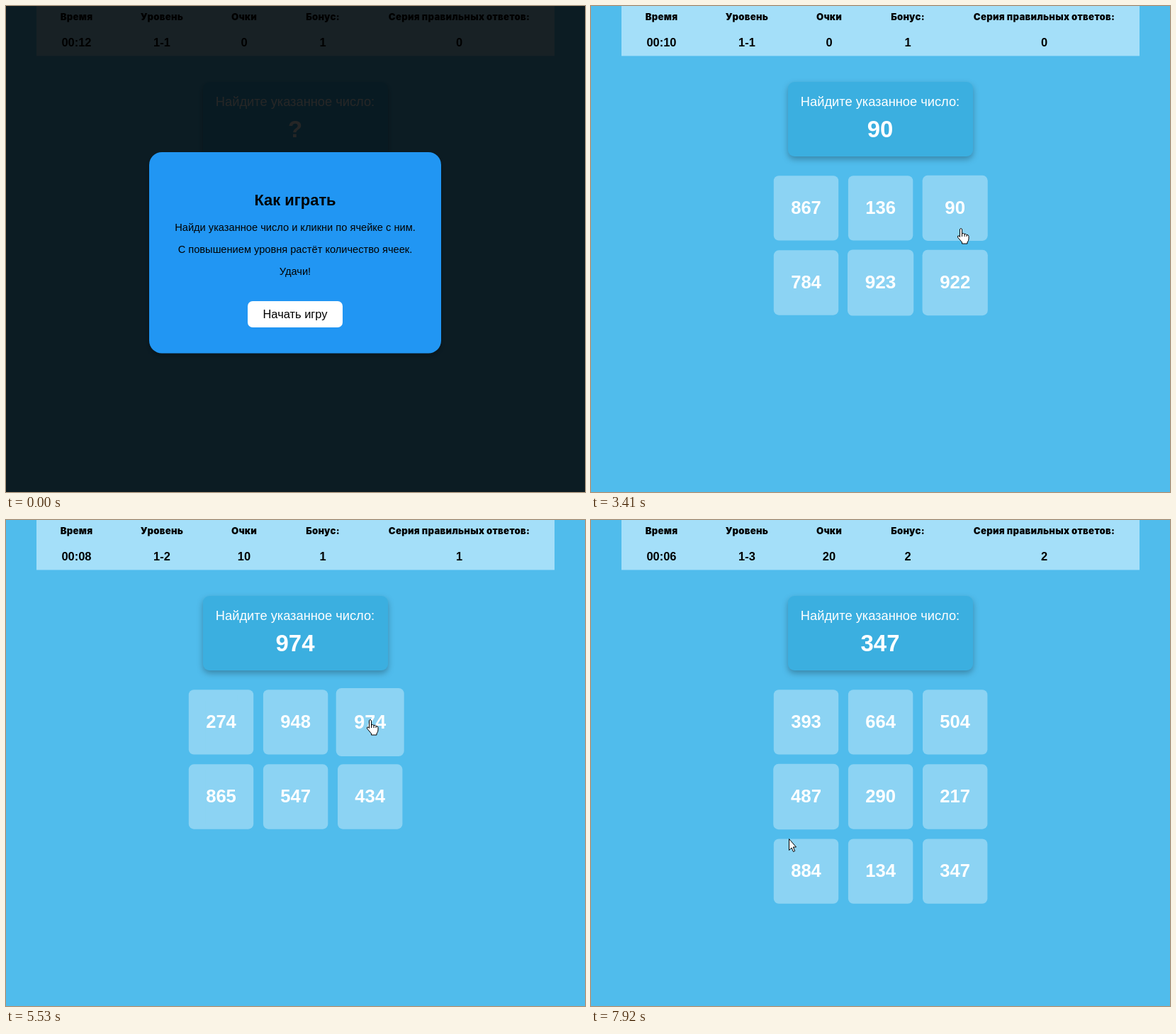
An HTML page that plays this animation: 817x685 px, repeating every 7990 ms.

```html
<!DOCTYPE html>
<html lang="ru">
<meta charset="utf-8">
<style>
  html, body { margin: 0; width: 100%; height: 100%; overflow: hidden; background: #50bcec }
  svg { display: block }
  text { font-family: "Liberation Sans", Arial, sans-serif; text-anchor: middle }
  .head { font: 900 13.2px "Arial Black", Inter, sans-serif; letter-spacing: .27px }
  .value { font-size: 16.45px; font-weight: bold }
  .cell { font-size: 25.6px; font-weight: bold; fill: #fff }
  .panel { filter: drop-shadow(0 4px 4px rgba(0, 0, 0, .28)) }
</style>
<svg id="stage" width="817" height="685" viewBox="0 0 817 685">
  <rect width="817" height="685" fill="#50bcec"/>
  <rect x="43" width="731" height="70.4" fill="#a4dff9"/>
  <g id="stats"></g>
  <rect class="panel" x="278" y="107" width="261" height="105" rx="9" fill="#3bafe0"/>
  <text x="408" y="141" font-size="18.28" fill="#fff">Найдите указанное число:</text>
  <text id="goal" x="408" y="185" font-size="32.9" font-weight="bold" fill="#fff"></text>
  <g id="cells"></g>
  <g id="intro">
    <rect width="817" height="685" opacity=".85"/>
    <rect class="panel" x="202" y="206" width="412" height="283.5" rx="18" fill="#2196f3"/>
    <text x="408" y="280.5" font-size="21.9" font-weight="bold">Как играть</text>
    <g font-size="14.63">
      <text x="408" y="317">Найди указанное число и кликни по ячейке с ним.</text>
      <text x="408" y="348">С повышением уровня растёт количество ячеек.</text>
      <text x="408" y="379">Удачи!</text>
    </g>
    <rect x="341" y="416" width="134" height="37" rx="7" fill="#fff"/>
    <text x="408" y="439.5" font-size="16.45">Начать игру</text>
  </g>
  <path id="cursor" fill="#fff" stroke="#000" stroke-linejoin="round"/>
</svg>
<script>
const LOOP = 7990, START = 1900, FADE = 280, HOVER = 300, PULSE = 600;
const SIZE = 91.4, PITCH = 105.1;
const ARROW = 'M.5 .5V16.5L4 13 6.5 18.5 8.7 17.5 6.3 12H10.5Z';
const HAND = 'M-1.5 12.5V1.5Q0-.5 1.5 1.5V8Q3.5 6.5 5 8.5 7 7.5 8 9.5 10.5 9 11 11.5V15Q11 18 9 20V22H1.5V20L-4.5 13Q-5 10-2.5 11Z M1.5 8V12M5 8.5V12M8 9.5V12';
const LEVELS = [
  { cells: [867, 136, 90, 784, 923, 922], answer: 2, click: 3870 },
  { cells: [274, 948, 974, 865, 547, 434], answer: 2, click: 5735 },
  { cells: [393, 664, 504, 487, 290, 217, 884, 134, 347], answer: 8, click: Infinity },
];
// each level opens one second after the previous right answer
LEVELS.forEach((level, n) => level.start = n ? LEVELS[n - 1].click + 1000 : START + 430);

// time, x, y of the pointer tip
const PATH = [
  [670, 774, 680], [1440, 476, 486], [1700, 415, 435.5], [3150, 415, 435.5], [3410, 522, 313],
  [3650, 522, 293], [4690, 522, 293], [5530, 514, 281], [5735, 514, 281], [6300, 664, 293],
  [6620, 664, 293], [7360, 410, 152], [7500, 270, 206], [7640, 226, 300], [7880, 279, 449],
];

const $ = id => document.getElementById(id);
const ramp = (t, from, length) => Math.min(1, Math.max(0, (t - from) / length));
const ease = p => p * p * (3 - 2 * p);
const show = (el, on) => el.setAttribute('display', on ? 'inline' : 'none');

function add(parent, tag, attrs = {}, text = '') {
  const el = document.createElementNS('http://www.w3.org/2000/svg', tag);
  for (const key in attrs) el.setAttribute(key, attrs[key]);
  el.textContent = text;
  return parent.appendChild(el);
}

const stats = [
  ['Время', 99.5], ['Уровень', 220], ['Очки', 336], ['Бонус:', 447], ['Серия правильных ответов:', 639.5],
].map(([name, x]) => {
  add($('stats'), 'text', { class: 'head', x, y: 20 }, name);
  return add($('stats'), 'text', { class: 'value', x, y: 57 });
});

const cells = Array.from({ length: 9 }, (_, i) => {
  const g = add($('cells'), 'g');
  const box = add(g, 'rect', { x: -SIZE / 2, y: -SIZE / 2, width: SIZE, height: SIZE, rx: 7.3 });
  const label = add(g, 'text', { class: 'cell', y: 8.3 });
  return { g, box, label, x: 303.5 + i % 3 * PITCH, y: 284.9 + Math.floor(i / 3) * PITCH };
});
$('cells').append(cells[2].g); // it grows above its neighbours

function pointer(t) {
  const n = PATH.findIndex(p => p[0] > t);
  if (n < 1) return PATH.at(n).slice(1);
  const [a, b] = [PATH[n - 1], PATH[n]], p = ramp(t, a[0], b[0] - a[0]);
  return [a[1] + (b[1] - a[1]) * p, a[2] + (b[2] - a[2]) * p];
}

const levelAt = t => LEVELS.findLastIndex((level, n) => !n || t >= level.start);

function over(i, t) {
  const [x, y] = pointer(t), cell = cells[i];
  return t >= LEVELS[0].start && i < LEVELS[levelAt(t)].cells.length &&
    Math.max(Math.abs(x - cell.x), Math.abs(y - cell.y)) < SIZE / 2;
}

// share of the last moments the pointer spent over the cell
function hover(i, t) {
  const steps = 20;
  let sum = 0;
  for (let k = 0; k < steps; k++) sum += over(i, t - k * HOVER / steps);
  return sum / steps;
}

function drawCell(cell, i, level, t) {
  show(cell.g, i < level.cells.length);
  const hit = i === level.answer ? t - level.click : -1;
  const pulse = ease(1 - Math.abs(1 - 2 * ramp(hit, 0, PULSE)));
  const green = ramp(hit, 0, 200);
  const size = Math.max(1 + .05 * hover(i, t), 1 + .5 * pulse);
  cell.g.setAttribute('transform', `translate(${cell.x} ${cell.y}) scale(${size})`);
  cell.box.setAttribute('fill', `rgba(${255 - 217 * green},255,${255 - 207 * green},${.34 + .66 * green})`);
  cell.label.textContent = level.cells[i];
}

function draw(t) {
  const n = levelAt(t), level = LEVELS[n];
  const hits = LEVELS.filter(l => t >= l.click).length;
  const seconds = t < 3150 ? 12 : 10 - Math.floor((t - 3150) / 1000);
  ['00:' + String(seconds).padStart(2, '0'), '1-' + (n + 1), hits * 10, Math.max(1, hits), hits]
    .forEach((value, i) => stats[i].textContent = value);
  $('goal').textContent = t < START ? '?' : level.cells[level.answer];

  $('cells').setAttribute('opacity', ease(ramp(t, level.start, FADE)));
  cells.forEach((cell, i) => drawCell(cell, i, level, t));

  const intro = 1 - ramp(t, START, FADE);
  $('intro').setAttribute('opacity', intro);
  show($('intro'), intro > 0);

  const [x, y] = pointer(t);
  const onButton = intro > 0 && x > 341 && x < 475 && y > 416 && y < 453;
  const hand = onButton || cells.some((_, i) => over(i, t));
  show($('cursor'), t >= PATH[0][0]);
  $('cursor').setAttribute('d', hand ? HAND : ARROW);
  $('cursor').setAttribute('transform', `translate(${Math.round(x)} ${Math.round(y)})`);
}

const origin = performance.now();
function tick() {
  draw((performance.now() - origin) % LOOP);
  requestAnimationFrame(tick);
}
tick();
</script>
</html>
```
